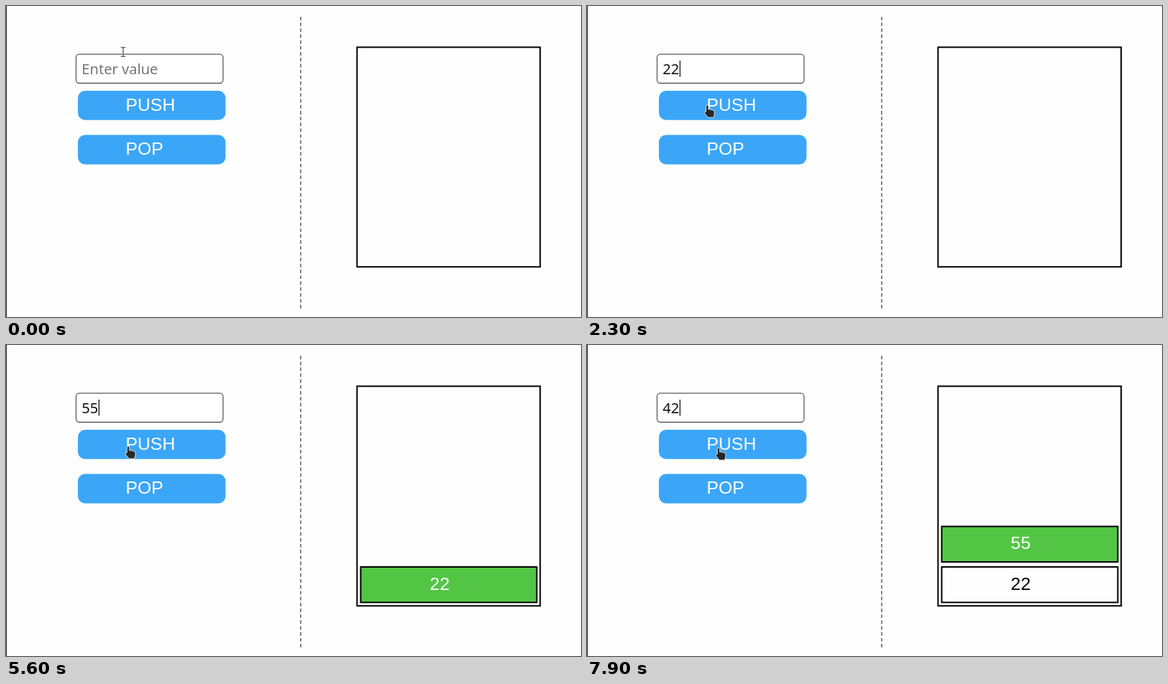
An HTML page that plays this animation: 800x433 px, repeating every 8 s.

```html
<!DOCTYPE html>
<html lang="en">
<head>
<meta charset="utf-8">
<title>Stack push</title>
<style>
  html, body { margin: 0; width: 100%; height: 100%; overflow: hidden; background: #fefefe; }
  svg { display: block; width: 100%; height: 100%; }
  .ui { font: 24.8px "Liberation Sans", Arial, sans-serif; fill: #fff; }
  .field { font: 20.1px "Noto Sans", "Open Sans", sans-serif; }
  .button { fill: #3ba6f7; }
  .cell rect { stroke: #000; stroke-width: 2; }
  .cell text { text-anchor: middle; }
</style>
</head>
<body>
<svg viewBox="0 0 800 433">
  <rect width="800" height="433" fill="#fefefe"/>
  <path d="M.5 0V433" stroke="#222"/>
  <path d="M410 15V421" pathLength="248" stroke="#7f8386" stroke-width="2" stroke-dasharray="3 2"/>
  <rect x="97.5" y="67.2" width="204.5" height="40.3" rx="4.5" fill="#fff" stroke="#5c5c5c" stroke-width="1.3"/>
  <text id="entry" class="field" x="105.3" y="94.8"></text>
  <path id="caret" d="M0 76V98.5" stroke="#111" stroke-width="1.3"/>
  <g class="ui">
    <rect class="button" x="100" y="118" width="205.5" height="40.8" rx="10"/>
    <text x="166.4" y="145.8">PUSH</text>
    <rect class="button" x="100" y="179.6" width="205.5" height="40.8" rx="10"/>
    <text x="166.4" y="207.4">POP</text>
  </g>
  <rect x="488.4" y="57.4" width="254.8" height="305.8" fill="none" stroke="#000" stroke-width="2"/>
  <g class="ui" id="stack"></g>
  <g id="beam" fill="none" stroke-linecap="round">
    <path id="bar" d="M-2.7-6.5H-1L0-5.5 1-6.5H2.7M0-5.5V5.5M-2.7 6.5H-1L0 5.5 1 6.5H2.7" stroke="#fff" stroke-width="2.6" opacity=".7"/>
    <path d="M-2.7-6.5H-1L0-5.5 1-6.5H2.7M0-5.5V5.5M-2.7 6.5H-1L0 5.5 1 6.5H2.7" stroke="#444" stroke-width="1.2"/>
  </g>
  <path id="hand" fill="#282828" stroke="#f4f4f4" stroke-width=".9" stroke-linejoin="round"
    d="M-1.8 1.4Q-1.6 0 0 0T1.8 1.6V6Q3.4 5 4.8 6.3 6.4 5.6 7.3 6.9 9.9 6.5 10 9.2V12.6L8.7 17.2H1L-3.7 11.4Q-4.4 9-2.8 8.6L-1.8 9.2Z"/>
</svg>
<script>
const LOOP = 8000, STEP = 100, KEY_GAP = 200;
const HINT = "Enter value", HOME = [163, 64];
const $ = id => document.getElementById(id);

const glide = (start, end, x, y) => ({ start, end, x, y });

// Each round: reach the field, focus, type a value, aim at PUSH, press it
const rounds = [
  { value: "22", reach: glide(100, 800, 160, 94), focus: 700, type: 1600,
    aim: glide(1800, 2500, 168, 142), push: 3000 },
  { value: "55", reach: glide(3600, 3700, 167, 87), focus: 3700, type: 4800,
    aim: glide(5000, 5600, 170, 141), push: 5800 },
  { value: "42", reach: glide(5900, 6400, 167, 87), focus: 6600, type: 7200,
    aim: glide(7400, 7900, 183, 143), push: LOOP }
];
const glides = rounds.flatMap(r => [r.reach, r.aim]);

const easeOut = p => 1 - (1 - p) ** 2;

function pointer(t) {
  return glides.reduce(([x, y], g) => {
    const p = easeOut(Math.min(1, Math.max(0, (t - g.start) / (g.end - g.start))));
    return [x + (g.x - x) * p, y + (g.y - y) * p];
  }, HOME);
}

const cells = rounds.map(({ value }, i) => {
  const y = 309 - i * 56.4;
  $("stack").insertAdjacentHTML("beforeend",
    `<g class="cell"><rect x="493.5" y="${y}" width="245" height="49.4"/>` +
    `<text x="603.4" y="${y + 31.8}">${value}</text></g>`);
  return $("stack").lastChild;
});

const show = (el, on) => { el.style.display = on ? "" : "none"; };

function draw(now) {
  const t = Math.floor(now % LOOP / STEP) * STEP;
  const depth = rounds.filter(r => r.push <= t).length;

  const { value, focus, type } = rounds[depth];
  const keys = Math.max(0, Math.floor((t - type) / KEY_GAP) + 1);
  const typed = value.slice(0, keys);
  $("entry").textContent = typed || HINT;
  $("entry").setAttribute("fill", typed ? "#111" : "#757575");
  $("caret").setAttribute("transform", `translate(${106.6 + typed.length * 11.4})`);
  show($("caret"), t >= focus);

  cells.forEach((cell, i) => {
    const top = i === depth - 1;
    show(cell, i < depth);
    cell.firstChild.setAttribute("fill", top ? "#52c644" : "#fefefe");
    cell.lastChild.setAttribute("fill", top ? "#fff" : "#000");
  });

  const [x, y] = pointer(t), over = y >= 118;
  for (const id of ["beam", "hand"]) $(id).setAttribute("transform", `translate(${x} ${y})`);
  show($("beam"), !over);
  show($("hand"), over);
}

const start = performance.now();
function tick() {
  draw(performance.now() - start);
  requestAnimationFrame(tick);
}
tick();
</script>
</body>
</html>
```
